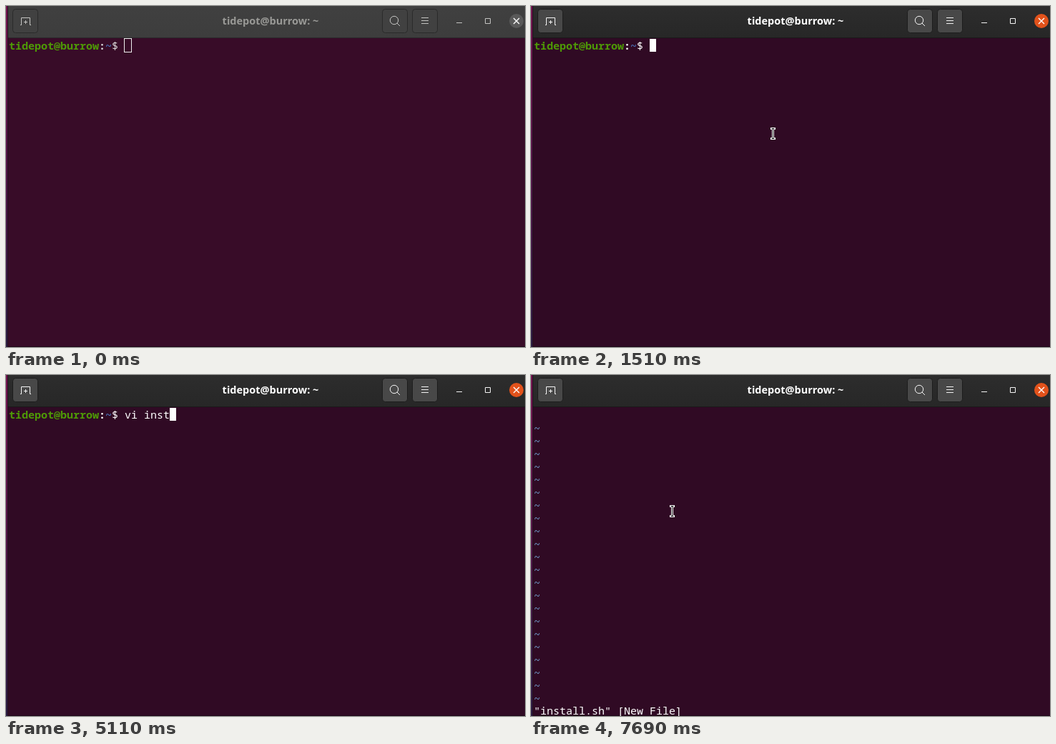
An HTML page for the animation above (8000 ms loop, 726 by 477 pixels).

```html
<!DOCTYPE html>
<html lang="en">
<head>
<meta charset="utf-8">
<title>Terminal</title>
<style>
  html, body { margin: 0; width: 100%; height: 100%; overflow: hidden; background: #300a24; }
  svg {
    display: block; width: 726px; height: 477px;
    --body: #300a24; --bar-top: #2d2d2d; --bar-end: #272727; --edge: #1a1a1a;
    --btn: #484848; --btn-edge: #1d1d1d; --icon: #f4f4f4; --title: #fff;
    --close: #e2521b; --ink: #fff;
  }
  svg.idle {
    --body: #380c28; --bar-top: #404040; --bar-end: #3d3d3d; --edge: #2a2a2a;
    --btn: #414141; --btn-edge: #2a2a2a; --icon: #c4c4c2; --title: #999996;
    --close: #595959; --ink: #dcdcdc;
  }
  text { white-space: pre; font: 15px "Noto Sans Mono", "DejaVu Sans Mono", monospace; fill: var(--ink); }
  .bold { font-weight: 700; }
  .title { font: 700 14.5px "Open Sans", "Noto Sans", sans-serif; fill: var(--title); text-anchor: middle; }
  .user { fill: #4e9a06; }
  .path { fill: #4a70b4; }
  .tilde { fill: #729fcf; }
  .btn { fill: var(--btn); stroke: var(--btn-edge); }
  .icon { fill: none; stroke: var(--icon); }
  .bar-top { stop-color: var(--bar-top); }
  .bar-end { stop-color: var(--bar-end); }
</style>
</head>
<body>
<svg id="stage" viewBox="0 0 726 477" class="idle">
  <defs>
    <linearGradient id="bar" x2="0" y2="1">
      <stop class="bar-top"/><stop offset="1" class="bar-end"/>
    </linearGradient>
    <linearGradient id="desk" x2="0" y2="1">
      <stop stop-color="#74134f"/><stop offset=".45" stop-color="#551247"/><stop offset="1" stop-color="#2b1a42"/>
    </linearGradient>
    <path id="beam" d="M-2 -7H2M0 -7V7M-2 7H2"/>
  </defs>

  <rect width="726" height="477" fill="var(--body)"/>
  <rect width="726" height="44" fill="url(#bar)"/>
  <rect y="44" width="726" height="1" fill="var(--edge)"/>
  <rect width="2" height="477" fill="url(#desk)"/>
  <rect x="2" width="1" height="477" fill="#24101f"/>
  <rect x="3" y="476" width="723" height="1" fill="#1d0717"/>

  <g class="btn">
    <rect x="9.5" y="4.5" width="35" height="33" rx="4"/>
    <rect x="526.5" y="4.5" width="35" height="33" rx="4"/>
    <rect x="568.5" y="4.5" width="35" height="33" rx="4"/>
  </g>
  <g class="icon">
    <path d="M20 26.5H21.5V16.5H33.5V26.5H35M25 22.5H30M27.5 20V25"/>
    <circle cx="543" cy="20" r="5.7"/>
    <path d="M547 24L551 28M581 16.5H591M581 20.5H591M581 24.5H591"/>
    <path d="M630 23.5H638M670.5 17.5H677.5V24.5H670.5Z"/>
  </g>
  <circle cx="714" cy="21" r="10" fill="var(--close)"/>
  <path d="M710 17L718 25M718 17L710 25" stroke="#fff" stroke-width="1.4"/>
  <text class="title" x="370" y="26">tidepot@burrow: ~</text>

  <g id="shell">
    <text class="bold user" x="4" y="61">tidepot@burrow</text>
    <text class="bold" x="130" y="61">:</text>
    <text class="bold path" x="139" y="61">~</text>
    <text x="148" y="61">$</text>
    <text id="typed" x="166" y="61"></text>
  </g>
  <g id="editor">
    <text x="4" y="475">"install.sh" [New File]</text>
  </g>

  <rect id="hollow" x="165.5" y="45.5" width="10" height="19" fill="none" stroke="#eee"/>
  <rect id="block" y="46" width="9" height="18" fill="var(--ink)"/>
  <g id="mouse">
    <use href="#beam" stroke="#fff" stroke-width="3" stroke-linecap="square"/>
    <use href="#beam" stroke="#111"/>
  </g>
</svg>
<script>
  const LOOP = 8000, CELL = 9, ROW = 18, BLINK = 520;
  const CLICK = 1330, FOCUS = 1510, TYPE = 2550, NAME = 4760, OPEN = 6140, REDRAW = 6825;
  const ENTER = 170, GLIDE = 990, RETURN = 7690;
  const command = 'vi ', file = 'install.sh';

  const $ = id => document.getElementById(id);
  const show = (id, on) => $(id).setAttribute('visibility', on ? 'visible' : 'hidden');
  const mix = (a, b, p) => a + (b - a) * p;

  // slow single keys, then a fast burst seen in six steps
  const clamp = (v, lo, hi) => Math.min(hi, Math.max(lo, v));
  const slowKey = t => clamp(Math.floor((t - TYPE) / 330) + 1, 0, command.length);
  const burst = t => clamp(Math.floor((t - NAME) / 174), -1, 5);
  const typedCount = t => slowKey(t) + Math.max(0, Math.floor(1 + 1.8 * burst(t)));

  // the block stays lit after every key press, then blinks
  function lastInput(t) {
    if (t >= REDRAW) return REDRAW;
    if (t >= OPEN) return OPEN;
    if (t >= NAME) return NAME + 174 * burst(t);
    if (t >= TYPE) return TYPE + 330 * (slowKey(t) - 1);
    return FOCUS;
  }
  const lit = t => t >= CLICK && (t < FOCUS || Math.floor((t - lastInput(t)) / BLINK) % 2 === 0);

  // glides in from the lower right in seven positions, hides while typing
  function pointer(t) {
    if (t >= RETURN) return [197.5, 190.5];
    if (t < ENTER || t >= TYPE) return null;
    const u = Math.min(1, Math.floor((t - ENTER) / 165) * 165 / GLIDE);
    return [mix(646.5, 338.5, Math.sin(u * Math.PI / 2)),
            mix(468.5, 178.5, (1 - Math.cos(u * Math.PI)) / 2)];
  }

  for (let row = 1; row <= 22; row++) {
    const mark = document.createElementNS('http://www.w3.org/2000/svg', 'text');
    mark.setAttribute('class', 'tilde');
    mark.setAttribute('x', 4);
    mark.setAttribute('y', 62 + row * ROW);
    mark.textContent = '~';
    $('editor').append(mark);
  }

  function draw(t) {
    const editing = t >= OPEN, count = typedCount(t), spot = pointer(t);
    $('stage').classList.toggle('idle', t < FOCUS);
    show('shell', !editing);
    show('editor', editing);
    $('typed').textContent = (command + file).slice(0, count);
    show('hollow', t < CLICK);
    show('block', lit(t));
    $('block').setAttribute('x', editing ? 4 : 166 + count * CELL);
    show('mouse', spot);
    if (spot) $('mouse').setAttribute('transform', `translate(${spot})`);
  }

  const origin = performance.now();
  function tick() {
    draw((performance.now() - origin) % LOOP);
    requestAnimationFrame(tick);
  }
  tick();
</script>
</body>
</html>
```
